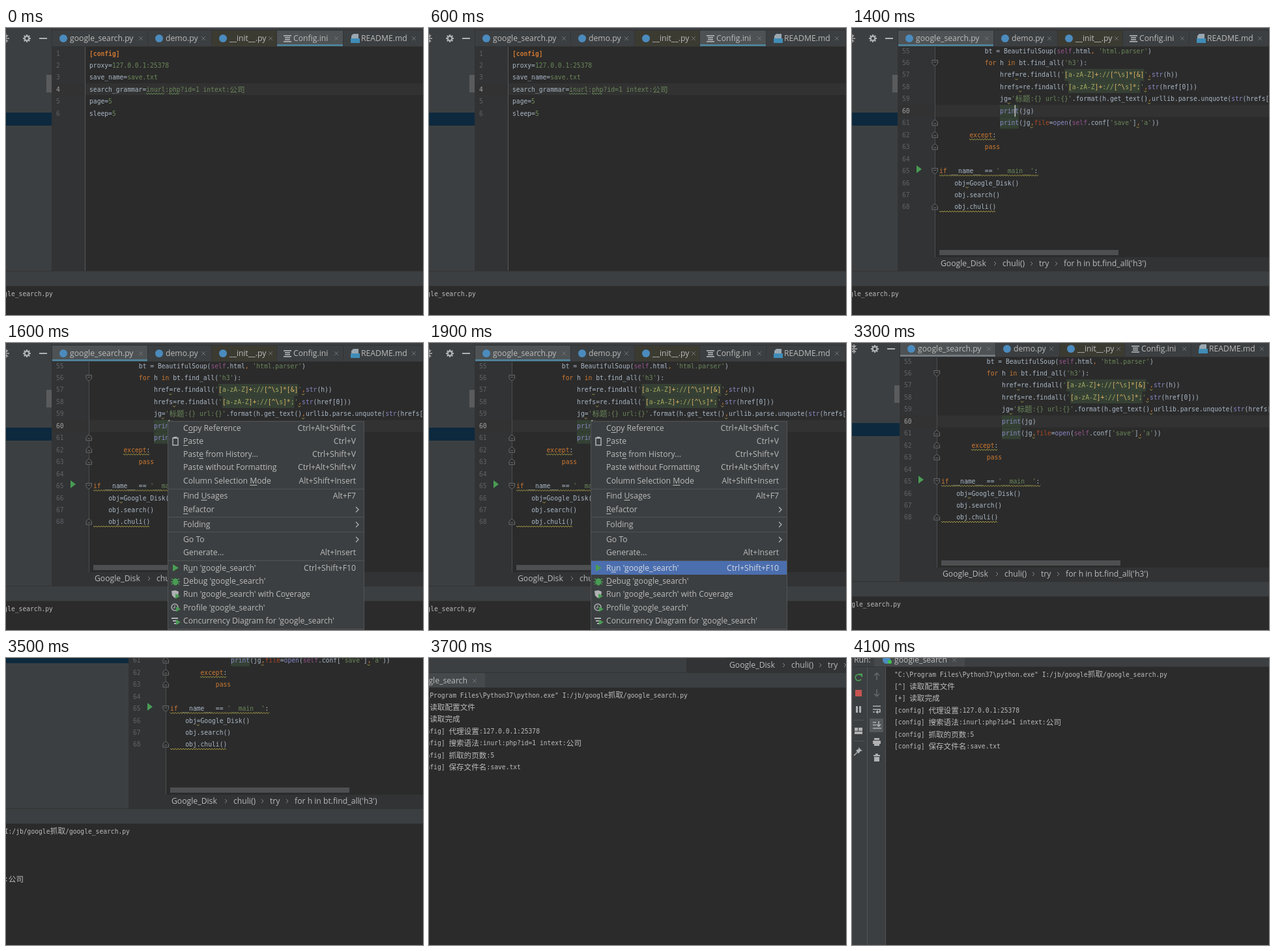
These frames come from a looping animation (640x441 px, 8 s). An HTML page with a canvas:

```html
<!DOCTYPE html>
<html lang="en">
<head>
<meta charset="utf-8">
<style>
html, body { margin: 0; width: 640px; height: 441px; overflow: hidden; background: #2b2b2b; }
canvas { display: block; }
</style>
</head>
<body>
<canvas id="stage" width="640" height="441"></canvas>
<script>
const ctx = document.getElementById('stage').getContext('2d');
const LOOP = 8000, CELL = 5.82, LINE = 18.46;
const MONO = '9.67px "DejaVu Sans Mono", monospace';
const CJK = '11.6px "Noto Sans CJK SC", "Noto Sans CJK", sans-serif';
const UI = '12.2px "Open Sans", "Noto Sans", sans-serif';
const C = {
  panel: '#3c3f41', editor: '#2b2b2b', gutter: '#313335', line: '#323232', edge: '#515355',
  text: '#a9b7c6', ui: '#bbbbbb', dim: '#606366', icon: '#afb1b3', green: '#6a8759',
  orange: '#cc7832', builtin: '#8888c6', warn: '#a69c45', run: '#499c54', blue: '#4b8bbe'
};

// Camera offsets while the view travels to the console.
const PAN = [[0, 0, 0], [3200, 1, -2], [3300, 3, -7], [3400, 38, -52], [3500, 118, -142],
  [3600, 224, -256], [3700, 325, -351], [3800, 384, -374], [4000, 406, -381], [4100, 412, -383]];

const latest = (steps, t) => steps.filter(s => s[0] <= t).pop();

function rect(x, y, w, h, color) {
  ctx.fillStyle = color;
  ctx.fillRect(x, y, w, h);
}

function stroke(color, width, ...paths) {
  ctx.strokeStyle = color;
  ctx.lineWidth = width;
  ctx.beginPath();
  for (const p of paths) {
    for (let i = 0; i < p.length; i += 2) ctx[i ? 'lineTo' : 'moveTo'](p[i], p[i + 1]);
  }
  ctx.stroke();
}

function poly(color, ...p) {
  ctx.fillStyle = color;
  ctx.beginPath();
  for (let i = 0; i < p.length; i += 2) ctx.lineTo(p[i], p[i + 1]);
  ctx.fill();
}

function disc(x, y, r, color) {
  ctx.fillStyle = color;
  ctx.beginPath();
  ctx.arc(x, y, r, 0, 7);
  ctx.fill();
}

function ring(x, y, r, color, width = 1.5, from = 0, to = 7) {
  ctx.strokeStyle = color;
  ctx.lineWidth = width;
  ctx.beginPath();
  ctx.arc(x, y, r, from, to);
  ctx.stroke();
}

function label(str, x, y, color = C.ui, align = 'left') {
  ctx.font = UI;
  ctx.fillStyle = color;
  ctx.textAlign = align;
  ctx.fillText(str, x, y + 4);
  ctx.textAlign = 'left';
}

// Monospaced text; wide characters take two cells. Returns the end x.
function mono(str, x, y, color = C.text, bold = false) {
  ctx.fillStyle = color;
  for (const part of str.match(/[\u4e00-\u9fff]+|[^\u4e00-\u9fff]+/g) || []) {
    const wide = part.charCodeAt(0) > 255;
    ctx.font = wide ? CJK : (bold ? 'bold ' : '') + MONO;
    ctx.fillText(part, x, y + (wide ? 4.3 : 3.5));
    x += part.length * CELL * (wide ? 2 : 1);
  }
  return x;
}

function squiggle(x1, x2, y, color = C.warn) {
  const p = [];
  for (let x = x1, i = 0; x <= x2; x += 2, i++) p.push(x, y + (i % 2 ? 1 : -1));
  stroke(color, 1, p);
}

function cross(x, y, color = '#6e7173') {
  stroke(color, 1, [x - 3, y - 3, x + 3, y + 3], [x + 3, y - 3, x - 3, y + 3]);
}

function projectPanel() {
  rect(-420, 0, 491, 373, C.panel);
  rect(-420, 130, 491, 20, '#0d293e');
  rect(62, 72, 8, 27, '#595b5d');
  stroke(C.icon, 1.5, [-5, 16, 5, 16], [0, 9, 0, 13], [0, 19, 0, 23],
    [-3, 11, 0, 14, 3, 11], [-3, 21, 0, 18, 3, 21]);
  for (let i = 0; i < 8; i++) {
    const a = i * Math.PI / 4, c = Math.cos(a), s = Math.sin(a);
    stroke(C.icon, 2.2, [32 + c * 3, 16 + s * 3, 32 + c * 6, 16 + s * 6]);
  }
  ring(32, 16, 3.3, C.icon, 2.2);
  rect(51, 15, 12, 2, C.icon);
  rect(70, 0, 1, 373, '#323436');
}

const TABS = [
  ['google_search.py', 71, 98, 207], ['demo.py', 218, 245, 303], ['__init__.py', 316, 343, 406],
  ['Config.ini', 416, 441, 507], ['README.md', 518, 545, 626]
];

function tabIcon(i, x) {
  if (i < 3) return disc(x, 16, 6, C.blue);
  if (i === 3) {
    for (let k = 0; k < 4; k++) rect(x - (k % 3 ? 4 : 6), 11 + k * 3, k % 3 ? 8 : 12, 1.7, C.icon);
    return;
  }
  poly('#9aa7b0', x - 3, 9, x + 5, 9, x + 5, 23, x - 6, 23, x - 6, 12);
  rect(x - 7, 16, 14, 7, '#3f8db8');
}

function tabBar(active, t) {
  rect(71, 0, 569, 28, C.panel);
  rect(71, 3, 569, 1, '#323436');
  TABS.forEach(([name, x, textX, closeX], i) => {
    const end = i < 4 ? TABS[i + 1][1] : 640;
    if (i === 2) rect(x, 4, end - x, 24, '#3c3b32');
    if (i === active) {
      rect(x, 4, end - x, 24, '#4e5254');
      rect(x, 25, end - x, 3, t < 2300 ? '#4f8199' : '#747a80');
    }
    rect(end - 1, 4, 1, 24, '#323436');
    tabIcon(i, textX - (i < 3 ? 10 : 9));
    label(name, textX, 16);
    const hover = i === 0 && t >= 500 && t < 600;
    cross(closeX, 16, hover ? '#b5b8ba' : undefined);
  });
  rect(71, 28, 569, 1, '#323232');
}

function configFile() {
  const rows = [['[config]'], ['proxy', '127.0.0.1:25378'], ['save_name', 'save.txt'],
    ['search_grammar', 'inurl:php?id=1 intext:公司'], ['page', '5'], ['sleep', '5']];
  rect(71, 28, 569, 345, C.editor);
  rect(71, 28, 51, 345, C.gutter);
  rect(71, 85, 569, 18, C.line);
  rect(121, 28, 1, 345, '#555759');
  rows.forEach(([key, value], i) => {
    const y = 39 + i * LINE;
    mono(String(i + 1), 77, y, i === 3 ? '#a4a3a3' : C.dim);
    if (!value) return mono(key, 128, y, C.orange, true);
    mono(value, mono(key + '=', 128, y), y, C.green);
  });
  squiggle(215, 244, 101, '#5f8a52');
  squiggle(250, 267, 101, '#5f8a52');
}

const CODE = String.raw`            bt = BeautifulSoup(self.html, 'html.parser')
            for h in bt.find_all('h3'):
                href=re.findall('[a-zA-Z]+://[^\s]*[&]',str(h))
                hrefs=re.findall('[a-zA-Z]+://[^\s]*;',str(href[0]))
                jg='标题:{} url:{}'.format(h.get_text(),urllib.parse.unquote(str(hrefs[0])))
                print(jg)
                print(jg,file=open(self.conf['save'],'a'))
        except:
            pass

if __name__ == '__main__':
    obj=Google_Disk()
    obj.search()
    obj.chuli()`.split('\n');
const TOKEN = /'[^']*'|\b(?:if|for|in|except|pass)\b|\b(?:print|str|open)\b|\bself\b|\bfile(?==)|,|\w+|[^\w',]/g;

function tokenColor(s) {
  if (s[0] === "'") return C.green;
  if (/^(if|for|in|except|pass|,)$/.test(s)) return C.orange;
  if (/^(print|str|open)$/.test(s)) return C.builtin;
  return { self: '#94558d', file: '#aa4926' }[s] || C.text;
}

function codeLine(str, y, row) {
  let x = 134;
  for (const tok of str.match(TOKEN) || []) {
    if (tok.startsWith("'[a")) {
      const inner = tok.slice(1, -1);
      x = mono("'", x, y, C.green);
      rect(x, y - 9, inner.length * CELL, LINE, '#364135');
      for (const ch of inner) x = mono(ch, x, y, /[[\]^&*+\\]/.test(ch) ? '#e0b565' : '#a3a95f');
      x = mono("'", x, y, C.green);
      continue;
    }
    const end = mono(tok, x, y, tokenColor(tok));
    const tight = tok === ',' && row > 0 || tok === '=' && [2, 3, 4, 11].includes(row);
    if (tight) squiggle(x, end, y + 7);
    x = end;
  }
}

function foldMark(y, dir) {
  const p = [123, y - 4 * dir, 131.5, y - 4 * dir, 131.5, y + dir, 127.2, y + 5 * dir, 123, y + dir, 123, y - 4 * dir];
  poly(C.editor, ...p);
  stroke('#6b6e70', 1, p, [125, y - dir, 129.5, y - dir]);
}

function sourceFile(t) {
  const row = t < 1400 ? 6 : 5;
  const rowY = i => 35 + i * LINE;
  rect(71, 28, 569, 345, C.editor);
  rect(71, 28, 56, 324, C.gutter);
  rect(71, rowY(row) - 9, 569, 18.5, C.line);
  rect(127, 28, 1, 324, '#4b4d4f');
  if (t >= 1400) {
    for (const i of [5, 6]) rect(227, rowY(i) - 9, 5 * CELL, 18, '#344134');
  }
  CODE.forEach((str, i) => {
    mono(String(55 + i), 77, rowY(i), i === row ? '#a4a3a3' : C.dim);
    codeLine(str, rowY(i), i);
  });
  squiggle(180, 221, rowY(7) + 7);
  squiggle(134, 286, rowY(10) + 7);
  squiggle(134, 221, rowY(13) + 7);
  for (const i of [1, 10]) foldMark(rowY(i), 1);
  for (const i of [6, 7, 8, 13]) foldMark(rowY(i), -1);
  poly(C.run, 99, 211, 107, 217, 99, 223);
  if (t < 1400) rect(471, rowY(6) - 9, 1.6, 18, C.ui);
  else if (t < 2800) rect(249.5, rowY(5) - 9, 1.6, 18, C.ui);
  rect(134, 341, 275, 8, '#4d4f50');
  rect(71, 352, 569, 21, C.gutter);
  [['Google_Disk', 136], ['chuli()', 231], ['try', 287], ["for h in bt.find_all('h3')", 325]].forEach(([s, x], i) => {
    label(s, x, 362);
    if (i) stroke('#85888a', 1, [x - 13, 359, x - 10, 362, x - 13, 365]);
  });
}

// Each entry: text, centre y, shortcut, underlined letter index.
const MENU = [
  ['Copy Reference', 131, 'Ctrl+Alt+Shift+C', 1], ['Paste', 151, 'Ctrl+V', 0],
  ['Paste from History...', 171, 'Ctrl+Shift+V', 4], ['Paste without Formatting', 191, 'Ctrl+Alt+Shift+V', -1],
  ['Column Selection Mode', 212, 'Alt+Shift+Insert', 17], ['Find Usages', 235, 'Alt+F7', 5],
  ['Refactor', 256, '>', 0], ['Folding', 279, '>', -1], ['Go To', 302, '>', -1],
  ['Generate...', 322, 'Alt+Insert', -1], ["Run 'google_search'", 345.5, 'Ctrl+Shift+F10', 1],
  ["Debug 'google_search'", 366, '', 0], ["Run 'google_search' with Coverage", 386, '', 27],
  ["Profile 'google_search'", 407, '', -1], ["Concurrency Diagram for 'google_search'", 427, '', -1]
];

function menuIcons() {
  stroke(C.icon, 1.5, [256, 146, 264, 146, 264, 157, 256, 157, 256, 145]);
  rect(257.5, 144, 5, 3, C.icon);
  poly(C.run, 256, 340, 265, 345.5, 256, 351);
  stroke(C.run, 1.3, [254, 362, 266, 371], [266, 362, 254, 371], [253, 367, 267, 367]);
  ctx.fillStyle = C.run;
  ctx.beginPath();
  ctx.ellipse(260, 367, 4, 5.5, 0, 0, 7);
  ctx.fill();
  poly(C.icon, 254, 381, 260, 380, 265, 382, 264, 388, 259, 392, 255, 388);
  poly(C.run, 260, 385, 267, 389, 260, 393);
  ring(259, 406, 5, C.icon);
  stroke(C.icon, 1.2, [259, 403, 259, 407, 256, 407]);
  poly(C.run, 261, 405, 268, 409, 261, 413);
  [422, 426, 430].forEach((y, i) => rect(254 + i * 2, y, 10 - i * 2, 2, C.icon));
  poly(C.run, 261, 425, 268, 429, 261, 433);
}

function contextMenu(t) {
  const hover = latest([[1600, -1], [1700, 5], [1800, 9], [1900, 10]], t)[1];
  rect(248, 120, 302, 321, C.edge);
  rect(249, 121, 300, 320, C.panel);
  for (const y of [224, 267, 290, 334, 439]) rect(249, y, 300, 1, C.edge);
  MENU.forEach(([name, y, key, mark], i) => {
    const color = i === hover ? '#d5d9e0' : C.ui;
    if (i === hover) rect(249, y - 10.5, 300, 21, '#4b6eaf');
    label(name, 272, y, color);
    if (mark >= 0) {
      const x = 272 + ctx.measureText(name.slice(0, mark)).width;
      rect(x, y + 6, ctx.measureText(name[mark]).width, 1, color);
    }
    if (key === '>') stroke(C.icon, 1.3, [537, y - 4, 541, y, 537, y + 4]);
    else label(key, 537, y, color, 'right');
  });
  menuIcons();
}

const OUTPUT = ['"C:\\Program Files\\Python37\\python.exe" I:/jb/google抓取/google_search.py',
  '[^] 读取配置文件', '[+] 读取完成', '[config] 代理设置:127.0.0.1:25378',
  '[config] 搜索语法:inurl:php?id=1 intext:公司', '[config] 抓取的页数:5', '[config] 保存文件名:save.txt'];

function runIcons() {
  ring(10, 30, 4.8, C.run, 1.8, 0.6, 5.4);
  poly(C.run, 10, 24, 16, 24, 16, 30);
  rect(5, 49, 10, 10, '#c75450');
  rect(6, 74, 3, 10, C.icon);
  rect(11, 74, 3, 10, C.icon);
  for (const y of [95, 127]) rect(3, y, 16, 1, C.edge);
  rect(4, 107, 5, 5, C.icon);
  rect(10, 107, 6, 5, C.icon);
  rect(4, 113, 12, 4, C.icon);
  poly(C.icon, 10, 137, 16, 143, 13, 143, 10, 147, 6, 142, 10, 140);
  stroke(C.icon, 1.5, [8, 145, 3, 150]);

  stroke('#66696b', 1.5, [38, 34, 38, 23], [34, 27, 38, 23, 42, 27]);
  stroke('#66696b', 1.5, [38, 48, 38, 59], [34, 55, 38, 59, 42, 55]);
  stroke(C.icon, 1.7, [32, 74, 44, 74], [32, 79, 43, 79, 43, 83, 38, 83], [32, 83, 35, 83]);
  poly(C.icon, 40, 80, 36, 83, 40, 86);
  rect(27, 93, 21, 21, '#55595b');
  stroke(C.icon, 1.6, [32, 99, 37, 99], [32, 103, 37, 103], [32, 108, 45, 108], [41, 97, 41, 105], [38, 102, 41, 105, 44, 102]);
  rect(34, 123, 8, 3, C.icon);
  rect(32, 127, 12, 5, C.icon);
  rect(34, 130, 8, 5, C.icon);
  rect(33, 149, 10, 2, C.icon);
  rect(36, 147, 4, 2, C.icon);
  rect(34, 152, 8, 7, C.icon);
}

function runPanel() {
  ctx.save();
  ctx.translate(-412, 383);
  rect(-10, -10, 1070, 460, C.editor);
  rect(-10, -10, 1070, 24, C.panel);
  rect(-10, -10, 1070, 1, '#323232');
  rect(-10, 13, 1070, 1, '#323436');
  rect(-10, 14, 62, 440, C.panel);
  rect(23, 14, 1, 440, C.edge);
  rect(51, 14, 1, 440, C.edge);
  rect(34, -9, 139, 22, '#45494b');
  label('Run:', 3, 3);
  disc(53, 3, 6, C.blue);
  disc(58, 6, 3, '#3fc24c');
  label('google_search', 65, 3);
  cross(157, 3);
  runIcons();
  OUTPUT.forEach((s, i) => mono(s, 65, 25 + i * LINE, C.ui));
  ctx.restore();
}

function frame(now) {
  const t = now % LOOP;
  const [, x, y] = latest(PAN, t);
  const config = t < 900;
  ctx.setTransform(1, 0, 0, 1, x, y);
  projectPanel();
  if (config) configFile();
  else sourceFile(t);
  tabBar(config ? 3 : 0, t);
  runPanel();
  if (t >= 1600 && t < 2300) contextMenu(t);
  requestAnimationFrame(frame);
}
requestAnimationFrame(frame);
</script>
</body>
</html>
```
